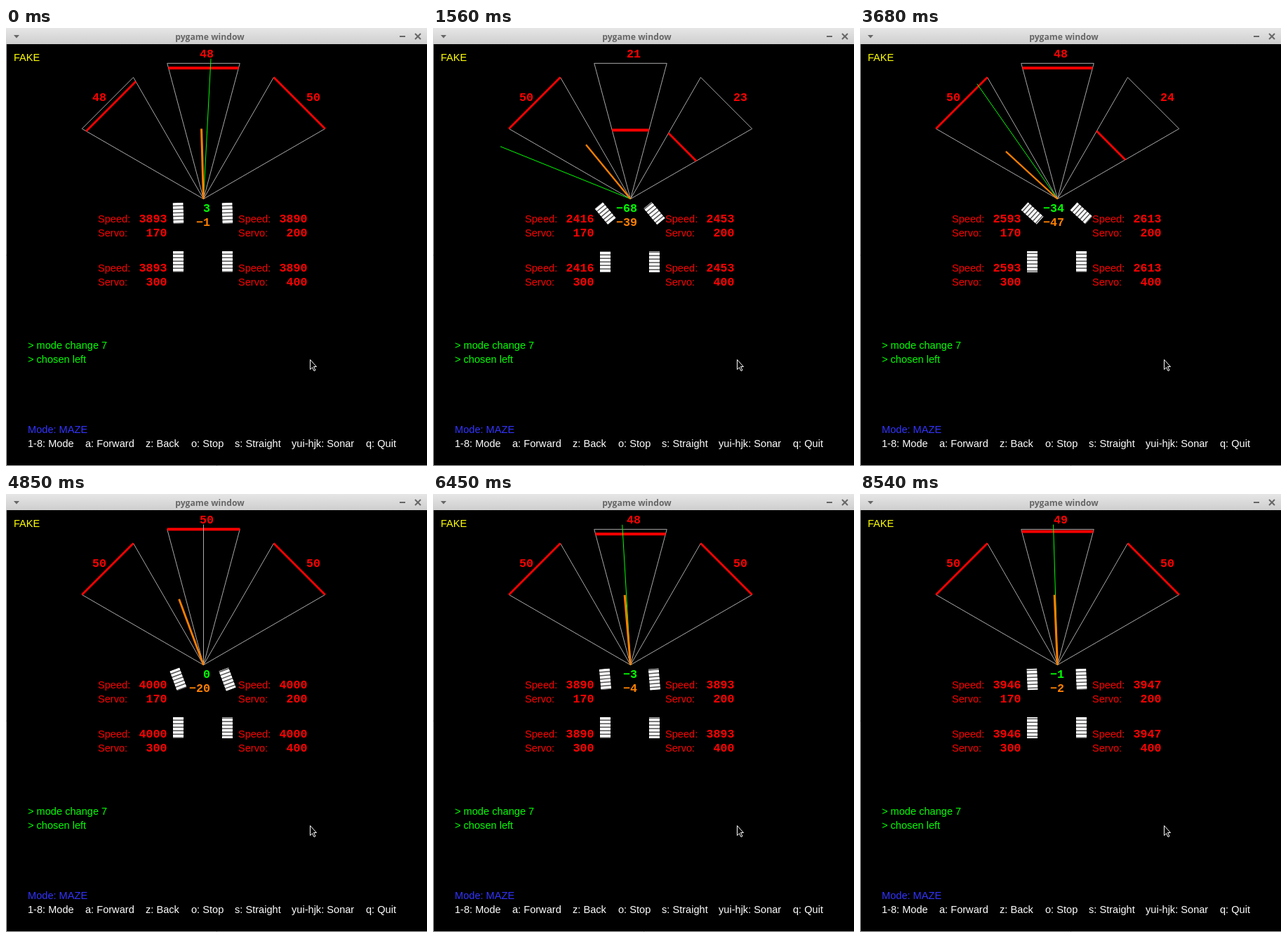
Animation, 600 px wide and 624 px high, one loop 8.57 s. Source, as an HTML page with a canvas:

```html
<!DOCTYPE html>
<html lang="en">
<head>
<meta charset="utf-8">
<title>pygame window</title>
<style>
html, body { margin: 0; width: 100%; height: 100%; overflow: hidden; background: #000; }
canvas { display: block; }
</style>
</head>
<body>
<canvas id="stage" width="600" height="624"></canvas>
<script>
const ctx = document.getElementById('stage').getContext('2d');
const LOOP = 8570, STEP = 40, RANGE = 50, LAG = 1000;
const SANS = '14.6px "Liberation Sans", Arial, sans-serif';
const MONO = 'bold 16.67px "Liberation Mono", Courier, monospace';
const TITLE = 'bold 12.2px "Open Sans", sans-serif';
const RED = '#f00', GREEN = '#0f0', ORANGE = '#ff8000', GREY = '#aaa';
const OX = 281.5, OY = 243.5;

// An obstacle takes depth off a sonar's range, with a ramp at each end
function obstacle(t, from, to, ramp, depth) {
  const k = Math.min(t - from, to - t) / ramp;
  return depth * Math.max(0, Math.min(1, k));
}

function gaps(t) {
  const left = obstacle(t, -300, 1000, 300, 2) + obstacle(t, 3900, 4200, 100, 1)
    + obstacle(t, 5980, 6300, 100, 2);
  const mid = obstacle(t, -300, 4200, 300, 2) + obstacle(t, 320, 3110, 700, 27)
    + obstacle(t, 6050, 7050, 250, 2) + obstacle(t, 7300, 9000, 400, 1.4);
  const right = obstacle(t, 320, 4310, 700, 27) + obstacle(t, 2500, 4600, 300, 2)
    + obstacle(t, 5400, 5950, 150, 2) + obstacle(t, 7400, 8300, 250, 1);
  return [left, mid, right].map(Math.round);
}

// The heading turns away from whatever is near; the inner wheels slow down
function drive(t) {
  const [left, mid, right] = gaps(t);
  const side = d => d * (1.53 - 0.0121 * d);
  const ahead = d => d * (1.72 - 0.017 * d);
  const heading = side(left) - side(right) - ahead(Math.max(0, mid - left));
  const gap = Math.max(left, mid, right);
  const fast = Math.round(4000 - 53.35 * gap);
  const slow = fast - Math.round(Math.abs(heading) * (0.87 - 0.0111 * gap));
  const speeds = heading < 0 ? [slow, fast] : [fast, slow];
  return { left, mid, right, heading, speeds };
}

// The steering follows the heading with a lag; wheels roll by their speed
const states = [];
let steer = -1.7, rolls = [0, 0];
for (let t = 0; t < LOOP; t += STEP) {
  const state = { ...drive(t), steer, rolls };
  states.push(state);
  steer += (state.heading - steer) * (1 - Math.exp(-STEP / LAG));
  rolls = rolls.map((r, i) => r + state.speeds[i] * STEP * 1.5e-5);
}

function text(str, x, y, color, font = SANS, align = 'left') {
  ctx.font = font;
  ctx.fillStyle = color;
  ctx.textAlign = align;
  ctx.fillText(str, x, y);
}

const number = (n, right, y, color) =>
  text(String(Math.trunc(n)).replace('-', '\u2212'), right, y, color, MONO, 'right');

function polar(deg, r) {
  const a = deg * Math.PI / 180;
  return [OX + r * Math.sin(a), OY - r * Math.cos(a)];
}

function line(points, color, width = 1) {
  ctx.strokeStyle = color;
  ctx.lineWidth = width;
  ctx.beginPath();
  points.forEach(p => ctx.lineTo(...p));
  ctx.stroke();
}

// Width is measured along an axis, so slanted bars come out thinner
function bar(a, b, color, width) {
  const dx = Math.abs(b[0] - a[0]), dy = Math.abs(b[1] - a[1]);
  line([a, b], color, width * Math.max(dx, dy) / Math.hypot(dx, dy));
}

function polygon(points, fill) {
  ctx.fillStyle = fill;
  ctx.beginPath();
  points.forEach(p => ctx.lineTo(...p));
  ctx.closePath();
  ctx.fill();
}

function sonar(dir, gap, labelRight, labelY) {
  const a = dir - 15, b = dir + 15, r = 200 - 3.4 * gap;
  line([[OX, OY], polar(a, 200), polar(b, 200), [OX, OY]], GREY);
  bar(polar(a, r), polar(b, r), RED, 4);
  number(RANGE - gap, labelRight, labelY, RED);
}

function wheel(x, y, deg, roll) {
  ctx.save();
  ctx.translate(x, y);
  ctx.rotate(deg * Math.PI / 180);
  ctx.beginPath();
  ctx.rect(-7.5, -15, 15, 30);
  ctx.clip();
  ctx.fillStyle = '#555';
  ctx.fillRect(-7.5, -15, 15, 30);
  ctx.fillStyle = '#fff';
  for (let s = -20 + Math.floor(roll) % 5; s < 15; s += 5) ctx.fillRect(-7.5, s, 15, 3.5);
  ctx.restore();
}

function motor(x, y, speed, servo) {
  text('Speed:', x, y, RED);
  number(speed, x + 98.5, y, RED);
  text('Servo:', x, y + 20, RED);
  number(servo, x + 98.5, y + 20, RED);
}

function windowFrame() {
  ctx.fillStyle = '#000';
  ctx.fillRect(0, 0, 600, 624);
  line([[0.5, 23], [0.5, 623.5], [600, 623.5]], '#b4b4b4');
  const shade = ctx.createLinearGradient(0, 0, 0, 23);
  shade.addColorStop(0, '#e6e6e6');
  shade.addColorStop(1, '#cecece');
  ctx.fillStyle = shade;
  ctx.fillRect(0, 0, 600, 23);
  text('pygame window', 290.5, 17, '#666', TITLE, 'center');
  polygon([[11, 10], [19, 10], [15, 14.5]], '#666');
  line([[561, 12], [569, 12]], '#666', 2);
  line([[583, 8], [591, 16]], '#666', 2);
  line([[591, 8], [583, 16]], '#666', 2);
}

function cursor() {
  const shape = [[433.5, 472.5], [433.5, 486.5], [436.5, 483.5], [439, 488.5],
    [441, 487.5], [438.5, 482.5], [442.5, 482.5]];
  polygon(shape, '#000');
  line([...shape, shape[0]], '#fff');
}

function staticText() {
  text('FAKE', 11, 47, '#ff0');
  text('> mode change 7', 31, 457, GREEN);
  text('> chosen left', 31, 477, GREEN);
  text('Mode: MAZE', 31, 577, '#33f');
  const keys = { '1-8: Mode': 31, 'a: Forward': 113, 'z: Back': 199, 'o: Stop': 264,
    's: Straight': 326, 'yui-hjk: Sonar': 407, 'q: Quit': 513 };
  for (const key in keys) text(key, keys[key], 597, '#fff');
}

function draw({ left, mid, right, heading, speeds, steer, rolls }) {
  windowFrame();
  sonar(-45, left, 143, 104);
  sonar(0, mid, 296, 42);
  sonar(45, right, 448, 104);
  line([[OX, OY], polar(heading, 200)], heading ? GREEN : GREY);
  bar([OX, OY], polar(steer, 100), ORANGE, 3);
  number(heading, 291, 262, GREEN);
  number(steer, 291, 282, ORANGE);
  speeds.forEach((speed, i) => {
    const wheelX = 245.5 + 70 * i, labelX = 131 + 200 * i;
    wheel(wheelX, 264, steer, rolls[i]);
    wheel(wheelX, 333, 0, rolls[i]);
    motor(labelX, 277, speed, 170 + 30 * i);
    motor(labelX, 347, speed, 300 + 100 * i);
  });
  staticText();
  cursor();
}

const start = performance.now();
function tick() {
  const t = (performance.now() - start) % LOOP;
  draw(states[Math.floor(t / STEP)]);
  requestAnimationFrame(tick);
}
tick();
</script>
</body>
</html>
```
